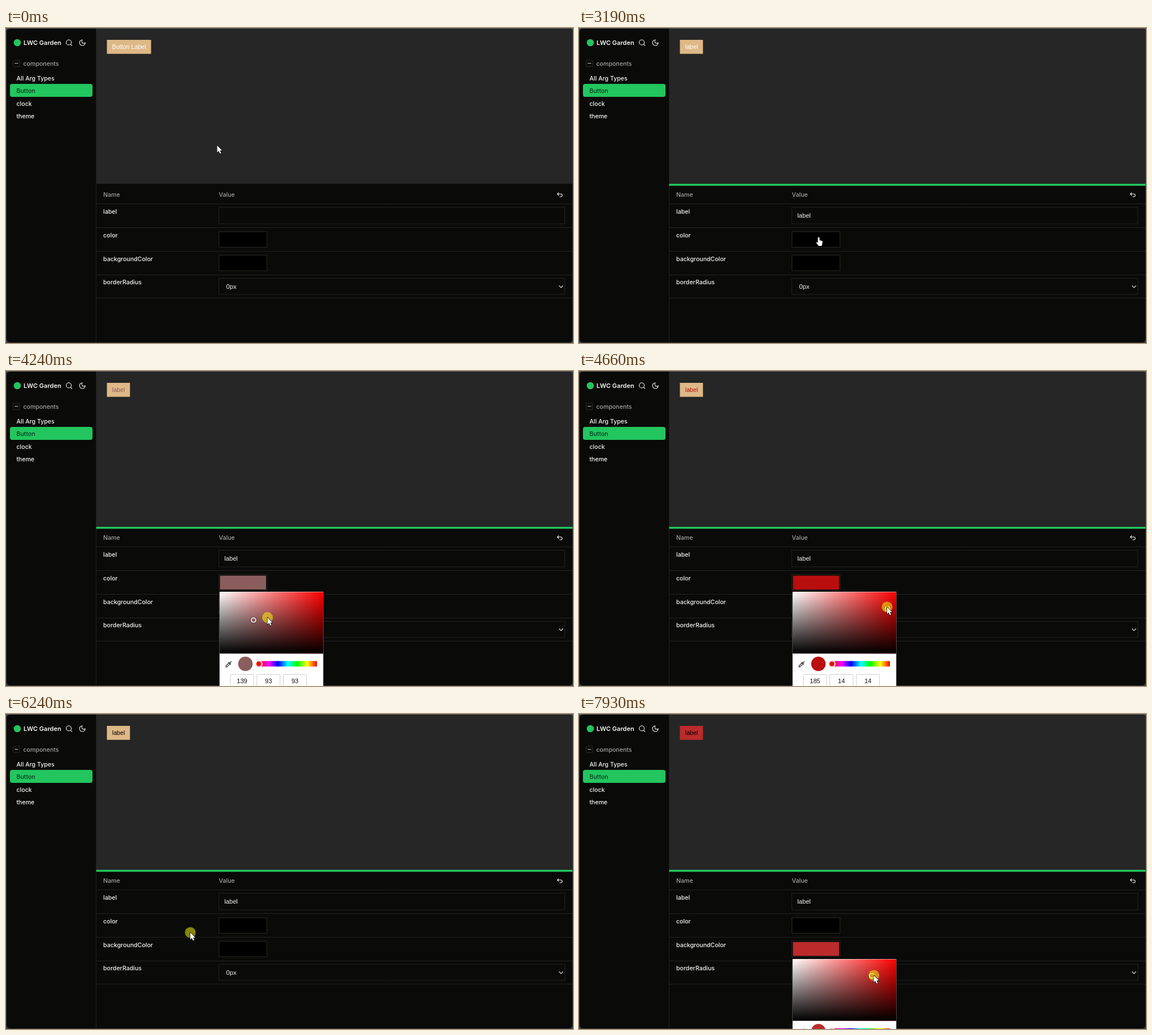
An HTML page with a canvas for the animation above (8 s loop, 1003x558 px).

```html
<!DOCTYPE html>
<html lang="en">
<head>
<meta charset="utf-8">
<title>Component preview</title>
<style>
html, body { margin: 0; width: 100%; height: 100%; overflow: hidden; background: #0a0a09; }
canvas { display: block; width: 1003px; height: 558px; }
</style>
</head>
<body>
<canvas id="stage" width="1003" height="558"></canvas>
<script>
const ctx = document.getElementById('stage').getContext('2d');
const LOOP = 8000, TICK = 70, ROW = 41.6;
const UI = 'Inter, sans-serif', ARIAL = '"Liberation Sans", Arial, sans-serif';
const BG = '#0a0a09', LINE = '#222221', GREEN = '#22c55e', WHITE = '#f5f5f4', GREY = '#a3a3a3';

const BAR_ON = 210, FOCUS = 770, TYPE = 1700, BLUR = 3110;
const FORE = { top: 391.5, open: 3260, drag: 3680, drop: 5630, close: 6180 };
const BACK = { top: 434.5, open: 6720, drag: 7180, drop: LOOP, close: LOOP };
const PRESSES = [
  [FOCUS, 900], [BLUR, 3185], [FORE.drag - TICK, FORE.drop],
  [FORE.close, 6320], [6530, 6650], [BACK.drag - TICK, LOOP]
];

// Eased pointer moves
const HOME = { x: 373.5, y: 208 };
const move = (from, to, x, y) => ({ from, to, x, y });
const MOVES = [
  move(0, 420, 400, 446),
  move(420, FOCUS, 405.5, 332.5),
  move(2840, 3050, 424, 371),
  move(FORE.open, FORE.drag, 390.5, 438.6),
  move(FORE.drag, 3890, 379.5, 452),
  move(3890, 4590, 545.7, 421.4),
  move(4590, 4660, 545, 418),
  move(4660, 5350, 373.5, 503),
  move(5350, FORE.drop, 354, 506),
  move(5830, FORE.close, 326, 387),
  move(6320, 6530, 420, 415),
  move(6650, 6850, 396, 486),
  move(BACK.drag, 7880, 521.5, 463)
];

const SEARCH = new Path2D('M3 11a8 8 0 1 0 16 0 8 8 0 1 0-16 0M21 21l-4-4');
const MOON = new Path2D('M12 3a6 6 0 0 0 9 9 9 9 0 1 1-9-9Z');
const UNDO = new Path2D('M8 13 4 9l4-4M4 9h11a4.5 4.5 0 0 1 0 9h-3');
const PIPETTE = new Path2D('M3 21v-3l9-9 3 3-9 9ZM11 7l6 6M15 9l4-4');
const CHEVRON = new Path2D('M6 9l6 6 6-6');
const ARROW = new Path2D('M0 0V12.4L2.8 9.8 4.9 14.4 7 13.4 5 9H8.8Z');
const HAND = new Path2D('M-1.4 1a1.4 1.4 0 0 1 2.8 0V5l4 1q1.6.4 1.5 2l-1.5 7H0L-4 10q-.8-1.3.4-1.7l2.2 1Z');
const BEAM = new Path2D('M-3-6.5Q0-6.5 0-4.5 0-6.5 3-6.5M0-5V5M-3 6.5Q0 6.5 0 4.5 0 6.5 3 6.5');

const clamp = v => Math.max(0, Math.min(1, v));
const ease = f => f * f * (3 - 2 * f);
const within = (t, a, b) => t >= a && t < b;
const css = c => `rgb(${c.rgb})`;

function box(x, y, w, h, fill, r = 0) {
  ctx.fillStyle = fill;
  ctx.beginPath();
  ctx.roundRect(x, y, w, h, r);
  ctx.fill();
}

function frame(x, y, w, h, color, width = 1, r = 0) {
  ctx.strokeStyle = color;
  ctx.lineWidth = width;
  ctx.beginPath();
  ctx.roundRect(x, y, w, h, r);
  ctx.stroke();
}

function disc(x, y, r, fill) {
  ctx.fillStyle = fill;
  ctx.beginPath();
  ctx.arc(x, y, r, 0, 7);
  ctx.fill();
}

function text(str, x, y, color = WHITE, font = `500 10.6px ${UI}`, align = 'left') {
  ctx.font = font;
  ctx.textAlign = align;
  ctx.fillStyle = color;
  ctx.fillText(str, x, y);
}

// Icons share a 24-unit grid, placed by its centre
function icon(path, x, y, color = WHITE, scale = 0.56) {
  ctx.save();
  ctx.translate(x, y);
  ctx.scale(scale, scale);
  ctx.translate(-12, -12);
  ctx.strokeStyle = color;
  ctx.lineWidth = 2;
  ctx.lineCap = ctx.lineJoin = 'round';
  ctx.stroke(path);
  ctx.restore();
}

const sample = t => Math.floor((t - 40) / TICK) * TICK + 40;

function pointer(t) {
  return MOVES.reduce((p, m) => {
    const f = ease(clamp((t - m.from) / (m.to - m.from)));
    return { x: p.x + (m.x - p.x) * f, y: p.y + (m.y - p.y) * f };
  }, HOME);
}

// The picker knob trails the pointer by one tick
function pick(t, { top, drag, drop }) {
  if (t < drag) return { s: 0, v: 0, rgb: [0, 0, 0] };
  const { x, y } = pointer(sample(Math.min(t, drop)) - TICK);
  const s = clamp((x - 379.3) / 180), v = clamp(1 - (y - top) / 109);
  const hi = Math.round(v * 255), lo = Math.round(v * 255 * (1 - s));
  return { s, v, rgb: [hi, lo, lo] };
}

// Four quick letters, then the last one after a pause
function typed(t) {
  if (t < TYPE) return '';
  const count = Math.min(4, 1 + Math.floor((t - TYPE) / TICK));
  return 'label'.slice(0, t < 2110 ? count : 5);
}

function sidebar() {
  disc(20, 26, 6.3, GREEN);
  text('LWC Garden', 31, 30, WHITE, `600 11px ${UI}`);
  icon(SEARCH, 111.6, 26);
  icon(MOON, 135.1, 26);
  frame(12.5, 57, 11.5, 11.5, '#2b2b2a', 1, 1);
  box(15.2, 62, 6.2, 1, '#c4c4c2');
  text('components', 30.5, 66.5, GREY);
  box(7, 99, 146, 23, GREEN, 4);
  ['All Arg Types', 'Button', 'clock', 'theme'].forEach((name, i) =>
    text(name, 18.5, 92.5 + i * 22.6, i === 1 ? '#0c3a1d' : WHITE));
  box(159, 1, 1, 556, '#1f1f1e');
}

function button(label, color, fill) {
  const font = `10.667px ${ARIAL}`;
  ctx.font = font;
  box(178.5, 21, ctx.measureText(label).width + 18.3, 24.7, fill);
  text(label, 187.8, 37, color, font);
}

function swatch(y, fill) {
  frame(376.5, y, 85.5, 28, '#232322');
  box(378.5, y + 2, 81.5, 24.5, fill);
}

function table(t, value, fore, back) {
  const font = `11.2px ${ARIAL}`, focused = within(t, FOCUS, BLUR);
  box(160, 276, 842, 282, BG);
  if (t >= BAR_ON) box(159.5, 276, 842.5, 3.4, GREEN);
  text('Name', 172, 299, GREY);
  text('Value', 376.5, 299, GREY);
  icon(UNDO, 979.7, 295.7, WHITE, 0.55);

  box(160, 311, 842, 1, LINE);
  text('label', 172, 328.5);
  ['color', 'backgroundColor', 'borderRadius'].forEach((name, i) =>
    text(name, 172, 371.2 + i * ROW));
  for (let i = 0; i < 4; i++) box(160, Math.round(353.4 + i * ROW), 842, 1, LINE);

  if (focused) frame(376, 317.5, 613.5, 30.5, '#177a3d', 2);
  else frame(376.5, 317.5, 612, 29.5, LINE);
  text(value, 386.2, 336, WHITE, font);
  if (focused && !within(t, 1350, TYPE) && t < 2640) {
    box(Math.round(386 + ctx.measureText(value).width), 326, 1, 13, WHITE);
  }
  swatch(360.5, css(fore));
  swatch(360.5 + ROW, css(back));
  frame(376.5, 443.5, 612, 28.5, LINE);
  text('0px', 389.5, 461.7, WHITE, font);
  icon(CHEVRON, 981.8, 458.2, WHITE, 0.55);
}

function gradient(x0, y0, x1, y1, colors) {
  const g = ctx.createLinearGradient(x0, y0, x1, y1);
  colors.forEach((c, i) => g.addColorStop(i / (colors.length - 1), c));
  return g;
}

function picker(top, c) {
  ctx.save();
  ctx.beginPath();
  ctx.rect(377.5, top - 0.5, 184, 300);
  ctx.clip();
  box(377.5, top - 0.5, 184, 300, '#fff');
  box(378, top, 183, 109, gradient(378, 0, 561, 0, ['#fff', '#f00']));
  box(378, top, 183, 109, gradient(0, top, 0, top + 109, ['rgba(0,0,0,0)', '#000']));

  const x = 379.3 + c.s * 180, y = top + (1 - c.v) * 109;
  disc(x, y, 5.8, 'rgba(0,0,0,.75)');
  disc(x, y, 5, '#fff');
  disc(x, y, 3.3, css(c));

  const mid = top + 127.3;
  icon(PIPETTE, 394.5, mid, '#222', 0.6);
  disc(423.5, mid, 12.8, css(c));
  box(447, mid - 5, 103, 9.6, gradient(550, 0, 447, 0,
    [0, 60, 120, 180, 240, 300, 360].map(h => `hsl(${h} 100% 50%)`)));
  disc(447.3, mid, 6.6, '#ccc');
  disc(447.3, mid, 6, '#fff');
  disc(447.3, mid, 4.5, '#f00');
  c.rgb.forEach((n, i) => {
    const left = 397 + i * 46.8;
    frame(left, top + 146, 41, 27, '#cfcfcf', 1, 1.5);
    text(n, left + 20.5, top + 161.8, '#111', `11.2px ${ARIAL}`, 'center');
  });
  ctx.restore();
}

function cursor(t, open) {
  const { x, y } = pointer(sample(t));
  if (PRESSES.some(([a, b]) => within(t, a, b))) disc(x, y, 9.6, 'rgba(255,255,0,.5)');
  const overInput = within(x, 376, 989) && within(y, 317, 348);
  const overSwatch = within(x, 377, 462) && [360, 360 + ROW].some(top => within(y, top, top + 29));
  ctx.save();
  ctx.translate(x, y);
  ctx.lineJoin = 'round';
  if (overInput) {
    ctx.translate(1.5, 1);
    ctx.strokeStyle = WHITE;
    ctx.lineWidth = 1.3;
    ctx.stroke(BEAM);
  } else {
    const shape = overSwatch && !open ? HAND : ARROW;
    ctx.strokeStyle = '#000';
    ctx.lineWidth = 1.4;
    ctx.stroke(shape);
    ctx.fillStyle = '#fff';
    ctx.fill(shape);
  }
  ctx.restore();
}

function draw(t) {
  const value = typed(t), fore = pick(t, FORE), back = pick(t, BACK);
  const foreOpen = within(t, FORE.open, FORE.close), backOpen = t >= BACK.open;

  box(0, 0, 1003, 558, '#3c3c3b');
  box(0, 0, 1003, 1, '#686867');
  ctx.save();
  ctx.beginPath();
  ctx.roundRect(1, 1, 1001, 556, 6);
  ctx.clip();
  box(0, 0, 1003, 558, BG);
  box(160, 1, 843, 275, '#262626');
  sidebar();
  button(value || 'Button Label', t < FORE.drag ? '#fff' : css(fore), t < BACK.drag ? '#deb887' : css(back));
  table(t, value, fore, back);
  ctx.restore();

  if (foreOpen) picker(FORE.top, fore);
  if (backOpen) picker(BACK.top, back);
  cursor(t, foreOpen || backOpen);
}

const began = performance.now();
function tick() {
  draw((performance.now() - began) % LOOP);
  requestAnimationFrame(tick);
}
tick();
</script>
</body>
</html>
```
